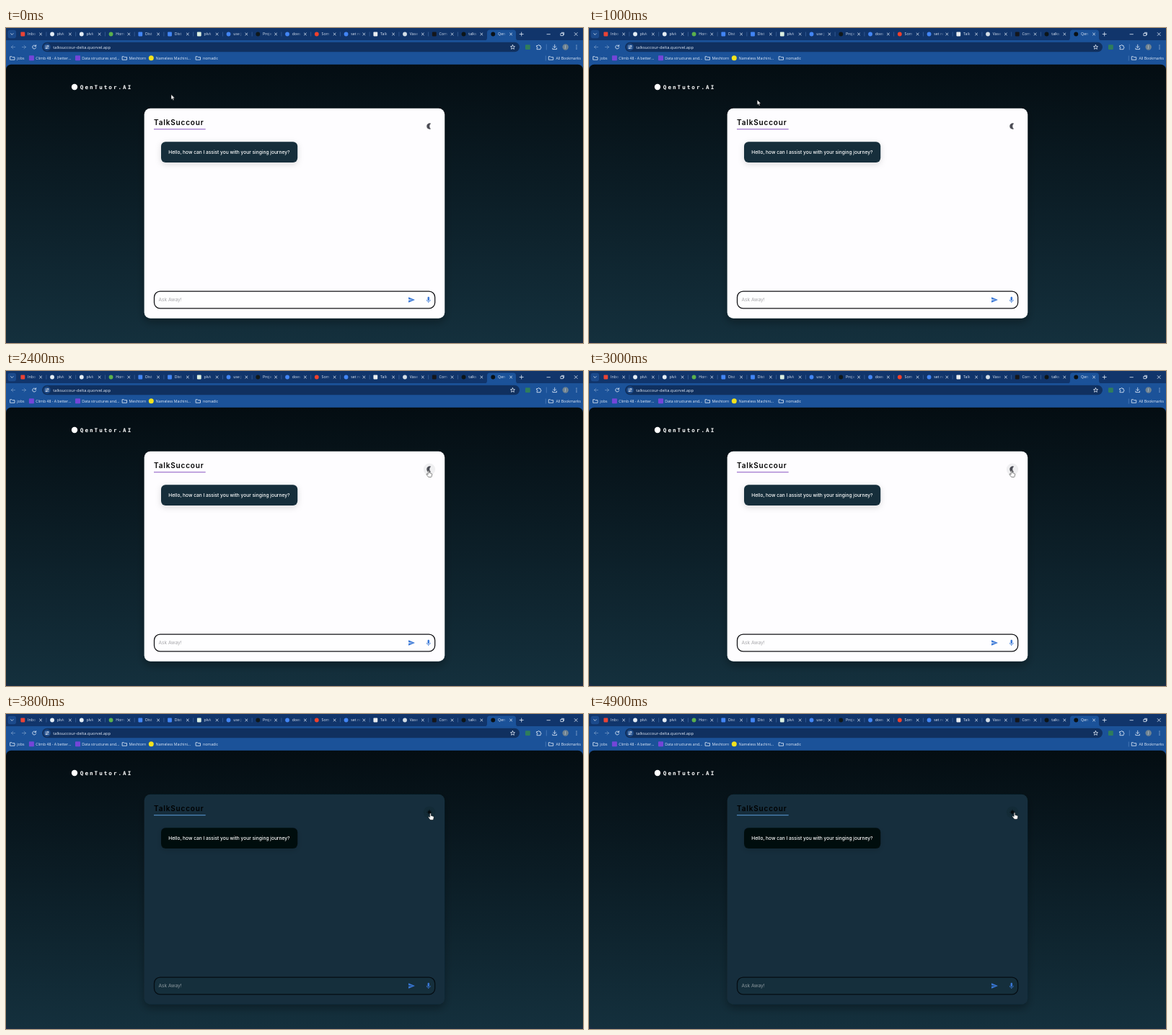
An HTML page for the animation above (5 s loop, 800x438 px).

```html
<!DOCTYPE html>
<html lang="en">
<head>
<meta charset="utf-8">
<title>Chat assistant</title>
<style>
  html, body { margin: 0; width: 100%; height: 100%; overflow: hidden; background: #1b5299; }
  svg { display: block; width: 100vw; height: 100vh; }
  text { white-space: pre; }
  .ui { font-family: "Open Sans", "Noto Sans", sans-serif; font-size: 5.2px; fill: #e3ecf9; }
  .url { font-size: 5.75px; }
  .app { font-family: Inter, "Liberation Sans", sans-serif; font-size: 6.6px; }
  .title { font-size: 10px; font-weight: 600; letter-spacing: .833px; }
  .brand { font-family: "DejaVu Sans Mono", monospace; font-size: 7.6px; font-weight: 700; letter-spacing: 2.02px; fill: #fff; }
  .line { fill: none; stroke: #e3ecf9; stroke-width: .8; stroke-linecap: round; stroke-linejoin: round; }
  .dim { opacity: .4; }
</style>
</head>
<body>
<svg viewBox="0 0 800 438" preserveAspectRatio="none" xmlns="http://www.w3.org/2000/svg">
  <defs>
    <linearGradient id="pageFill" x1="0" y1="0" x2="0" y2="1">
      <stop offset="0" stop-color="#040d12"/>
      <stop offset="1" stop-color="#14303d"/>
    </linearGradient>
    <linearGradient id="fade">
      <stop offset="0" stop-color="#11356b" stop-opacity="0"/>
      <stop offset="1" stop-color="#11356b"/>
    </linearGradient>
    <linearGradient id="fadeActive">
      <stop offset="0" stop-color="#1b5299" stop-opacity="0"/>
      <stop offset="1" stop-color="#1b5299"/>
    </linearGradient>
    <filter id="cardShadow" x="-10%" y="-10%" width="120%" height="125%">
      <feDropShadow dx="0" dy="5" stdDeviation="6" flood-color="#000" flood-opacity=".32"/>
    </filter>
    <filter id="bubbleShadow" x="-10%" y="-40%" width="120%" height="200%">
      <feDropShadow dx="0" dy="2.5" stdDeviation="4" flood-color="#000" flood-opacity=".14"/>
    </filter>
    <g id="folder">
      <path class="line" d="M-3 -2.1h2l.8 .9h3.2v3.6h-6z"/>
    </g>
  </defs>

  <!-- browser frame -->
  <rect width="800" height="18" fill="#11356b"/>
  <rect y="17" width="800" height="34" fill="#1b5299"/>
  <path d="M663 17.5q4 0 4 -4v-7q0 -4 4 -4h32q4 0 4 4v7q0 4 4 4z" fill="#1b5299"/>
  <rect x="2.5" y="2.7" width="11.5" height="11.5" rx="3.2" fill="#1b4a8c"/>
  <path class="line" d="M6.6 7.7l1.7 1.7 1.7 -1.7"/>
  <g id="tabs"></g>
  <path class="line" d="M712.2 8.5h5M714.7 6v5"/>
  <path class="line" d="M750 8.7h4.4M788.2 6.5l4 4M792.2 6.5l-4 4"/>
  <path class="line" d="M769.3 7.4h3.2v3.2h-3.2zM770.4 6.3h3.2v3.2" stroke-width=".7"/>

  <!-- toolbar -->
  <rect x="50" y="19.8" width="662" height="13.4" rx="6.7" fill="#10305f"/>
  <path class="line dim" d="M12.4 26.5h-5M9.8 24.1l-2.4 2.4 2.4 2.4M22.4 26.5h5M25 24.1l2.4 2.4 -2.4 2.4"/>
  <path class="line" d="M41.2 25a2.5 2.5 0 1 0 .4 2.2M41.6 23.6v1.8h-1.8"/>
  <circle cx="57" cy="26.5" r="4.9" fill="#1d4a88"/>
  <path class="line" d="M54.7 25.2h2M59 25.2h.3M54.7 27.9h.3M57.3 27.9h2"/>
  <circle class="line" cx="57.9" cy="25.2" r=".8"/>
  <circle class="line" cx="56" cy="27.9" r=".8"/>
  <text class="ui url" x="65.3" y="28.5">talksuccour-delta.quorvel.app</text>
  <path class="line" d="M702.5 23.5l.9 2 2.1 .2 -1.6 1.5 .5 2.1 -1.9 -1.1 -1.9 1.1 .5 -2.1 -1.6 -1.5 2.1 -.2z" stroke-width=".65"/>
  <rect x="720" y="23.2" width="6.8" height="6.8" rx="1" fill="#2f7d5c"/>
  <path class="line" d="M736 24.5h1.6a1 1 0 0 1 2 0h1.4v1.7a1 1 0 0 1 0 2v1.5h-5v-1.5a1 1 0 0 0 0 -2z"/>
  <path d="M749.3 22.5v8" stroke="#5d8bc6" stroke-width=".6"/>
  <path class="line" d="M760.7 23.2v4M758.9 25.6l1.8 1.8 1.8 -1.8M757.9 28v1.6h5.6v-1.6"/>
  <circle cx="775.7" cy="26.5" r="4.2" fill="#6f8290"/>
  <text class="ui" x="775.7" y="28.4" text-anchor="middle">J</text>
  <path d="M791 24.1v.01M791 26.5v.01M791 28.9v.01" stroke="#e3ecf9" stroke-width="1.2" stroke-linecap="round"/>

  <!-- bookmarks -->
  <g id="marks"></g>
  <path d="M748.3 38.5v7" stroke="#5d8bc6" stroke-width=".6"/>

  <!-- page -->
  <rect y="430" width="800" height="8" fill="#1b2c45"/>
  <rect y="50.7" width="800" height="386.6" rx="7" fill="url(#pageFill)"/>
  <circle cx="95" cy="82" r="4.2" fill="#fff"/>
  <text class="brand" x="102.8" y="84.6">QenTutor.AI</text>

  <rect id="card" x="191.7" y="111.8" width="416.5" height="292" rx="8.5" filter="url(#cardShadow)"/>
  <text class="app title" x="205" y="135" fill="#000">TalkSuccour</text>
  <rect id="rule" x="205" y="140.2" width="71.7" height="1"/>
  <circle id="hover" cx="587" cy="136.8" r="8.2"/>
  <path id="moon" d="M589.2 132.7a4.2 4.2 0 1 0 0 7.6a4.6 4.6 0 0 1 0 -7.6z" fill="#4c4d55"/>
  <g id="sun" fill="#050b0f" stroke="#050b0f" stroke-width=".7">
    <circle cx="587" cy="136.5" r="1.9"/>
    <path id="rays"/>
  </g>
  <rect id="bubble" x="215" y="158.2" width="189.2" height="28.8" rx="6.2" filter="url(#bubbleShadow)"/>
  <text class="app" x="225.3" y="175.3" font-weight="500" fill="#fff">Hello, how can I assist you with your singing journey?</text>
  <rect id="field" x="205.5" y="366.1" width="389.2" height="23.8" rx="8.2" stroke-width="1.25"/>
  <text id="hint" class="app" x="211.4" y="380.2">Ask Away!</text>
  <g fill="#3a78d6">
    <path transform="translate(557.2 372.9) scale(.425)" d="M2 21L23 12 2 3v7l15 2-15 2z"/>
    <path transform="translate(580.7 373) scale(.425)" d="M12 14c1.66 0 3-1.34 3-3V5c0-1.66-1.34-3-3-3S9 3.34 9 5v6c0 1.66 1.34 3 3 3zM17.3 11c0 3-2.54 5.1-5.3 5.1S6.7 14 6.7 11H5c0 3.41 2.72 6.23 6 6.72V21h2v-3.28c3.28-.49 6-3.31 6-6.72z"/>
  </g>

  <!-- pointer -->
  <g id="pointer">
    <path id="arrow" d="M0 0v7l1.6 -1.5 1.1 2.5 1.2 -.5 -1.1 -2.4h2.2z" fill="#fff" stroke="#111" stroke-width=".45"/>
    <path id="hand" d="M-.8 .7q.8 -1.2 1.6 0v3l1.3 .2 2 .7q.7 .3 .6 1.2l-.5 2.7q-.2 1 -1.2 1h-2.7q-.7 0 -1.2 -.7l-2 -2.8q-.5 -1 .4 -1.1l1.7 .9z" fill="#fff" stroke="#111" stroke-width=".5"/>
  </g>
</svg>
<script>
const LOOP = 5000, DARK_AT = 3080;
const $ = id => document.getElementById(id);

function add(parent, tag, attrs, label) {
  const el = document.createElementNS("http://www.w3.org/2000/svg", tag);
  for (const key in attrs) el.setAttribute(key, attrs[key]);
  if (label) el.textContent = label;
  parent.append(el);
  return el;
}

function badge(parent, x, y, color, square, r = 3) {
  if (square) add(parent, "rect", { x: x - r, y: y - r, width: 2 * r, height: 2 * r, rx: .8, fill: color });
  else add(parent, "circle", { cx: x, cy: y, r, fill: color });
}

// label, icon colour, square icon
const tabs = [
  ["Inbo", "#ea4335", 1], ["plvk", "#e4edf5"], ["plvk", "#e4edf5"], ["Hom", "#5bb04c"],
  ["Dist", "#4285f4", 1], ["Dist", "#4285f4", 1], ["plvk", "#dcefe0", 1], ["use j", "#4285f4"],
  ["Proje", "#10181a"], ["does", "#4285f4"], ["Som", "#f0402c"], ["set re", "#4285f4"],
  ["Talk", "#e9edf0", 1], ["Vase", "#d3dde6"], ["Com", "#15171c", 1], ["talks", "#0d1518"], ["Qen", "#0a1115"]
];

tabs.forEach(([label, color, square], i) => {
  const g = $("tabs"), x = 23.3 + i * 40.75, active = i === tabs.length - 1;
  badge(g, x, 8.5, color, square, 2.9);
  add(g, "text", { class: "ui", x: x + 6.8, y: 10.4 }, label);
  add(g, "rect", { x: x + 12.5, y: 3.5, width: 8.5, height: 11, fill: `url(#fade${active ? "Active" : ""})` });
  add(g, "path", { class: "line", d: `M${x + 23.3} 7l3 3m0 -3l-3 3` });
  if (i < tabs.length - 2) add(g, "path", { d: `M${x + 32.6} 5.5v6`, stroke: "#4a72ab", "stroke-width": .6 });
});

// icon x, text x, label, icon colour (none means folder), square icon
const marks = [
  [9, 15.3, "jobs"], [35.4, 41.2, "Climb 48 - A better...", "#7446d8", 1],
  [99.5, 105.3, "Data structures and...", "#7446d8", 1], [164.5, 170.6, "Meshtorn"],
  [201.3, 207.8, "Nameless Machini...", "#f2e21d"], [266.5, 273, "nomadic"], [755.7, 762.4, "All Bookmarks"]
];

for (const [ix, tx, label, color, square] of marks) {
  const g = $("marks");
  if (color) badge(g, ix, 41.8, color, square, 3.5);
  else add(g, "use", { href: "#folder", transform: `translate(${ix} 41.8)` });
  add(g, "text", { class: "ui", x: tx, y: 43.7 }, label);
}

let rays = "";
for (let k = 0; k < 8; k++) {
  const c = Math.cos(k * Math.PI / 4), s = Math.sin(k * Math.PI / 4);
  rays += `M${587 + 2.7 * c} ${136.5 + 2.7 * s}L${587 + 3.8 * c} ${136.5 + 3.8 * s}`;
}
$("rays").setAttribute("d", rays);

// time, x, y of the pointer tip
const path = [
  [0, 229, 92.5], [1000, 233.2, 100], [1300, 234, 100], [1700, 812, 445], [1800, 812, 445],
  [1900, 744, 422], [2350, 586, 138], [3600, 586, 138], [3800, 588.5, 137.8], [4200, 590, 136.8], [5000, 590, 136.8]
];

function pointerAt(t) {
  const i = Math.max(1, path.findIndex(p => p[0] > t));
  const [t0, x0, y0] = path[i - 1], [t1, x1, y1] = path[i];
  const p = (t - t0) / (t1 - t0), e = p * p * (3 - 2 * p);
  return [x0 + (x1 - x0) * e, y0 + (y1 - y0) * e];
}

const show = (id, on) => $(id).setAttribute("visibility", on ? "visible" : "hidden");
const paint = (id, fill) => $(id).setAttribute("fill", fill);

function draw(t) {
  const dark = t >= DARK_AT;
  const [x, y] = pointerAt(t);
  const over = Math.hypot(x - 587, y - 136.8) < 8.2;

  paint("card", dark ? "#152f3c" : "#fefdff");
  paint("rule", dark ? "#5a9bd8" : "#8a57c2");
  paint("bubble", dark ? "#050d11" : "#152f3b");
  paint("field", dark ? "#152f3c" : "#fefeff");
  $("field").setAttribute("stroke", dark ? "#050d12" : "#101014");
  paint("hint", dark ? "#8d999f" : "#a6a6aa");
  paint("hover", dark ? "#132b37" : "#efeff1");
  show("hover", over);
  show("moon", !dark);
  show("sun", dark);
  show("arrow", !over);
  show("hand", over);
  $("pointer").setAttribute("transform", `translate(${x} ${y})`);
}

const start = performance.now();
function tick() {
  draw((performance.now() - start) % LOOP);
  requestAnimationFrame(tick);
}
tick();
</script>
</body>
</html>
```
